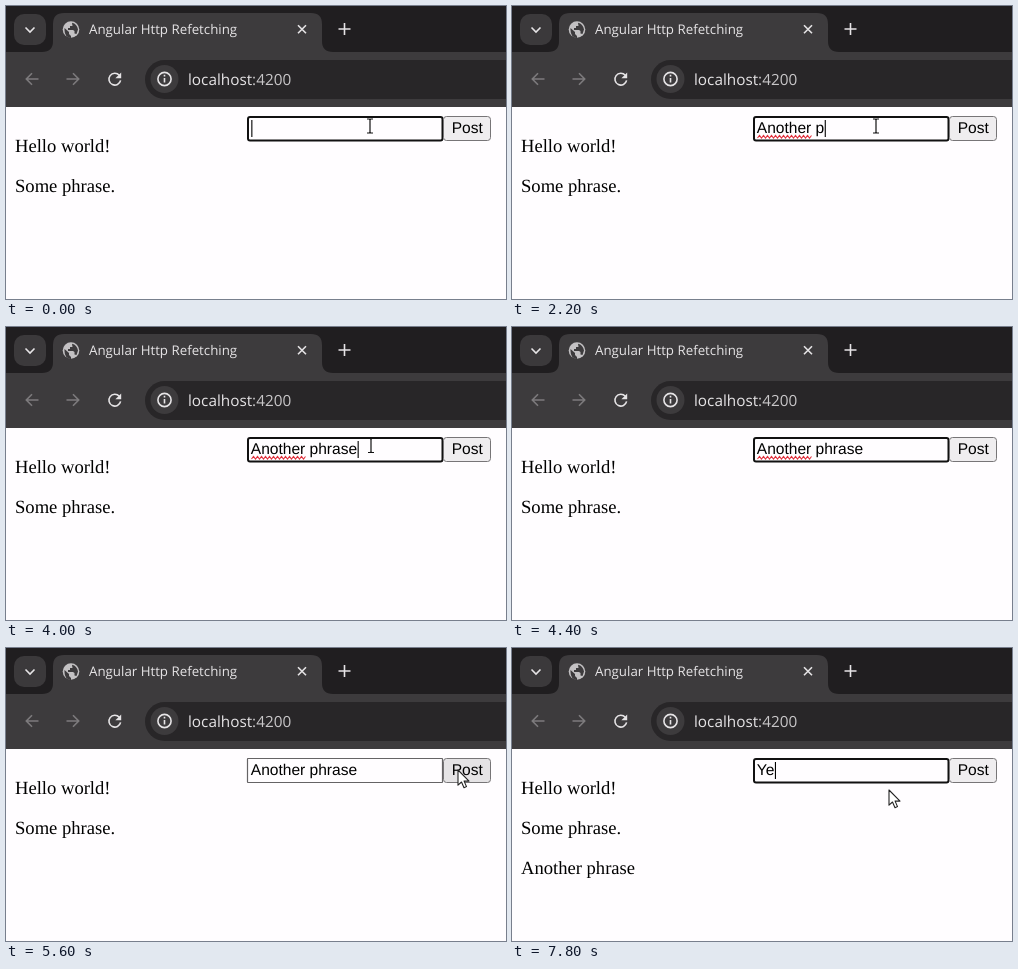
An HTML page that plays this animation: 500x293 px, repeating every 8000 ms.

```html
<!DOCTYPE html>
<html lang="en">
<head>
<meta charset="utf-8">
<title>Angular Http Refetching</title>
<style>
  html, body { margin: 0; width: 100%; height: 100%; overflow: hidden; background: #fffdff; }
  svg { display: block; width: 100%; height: 100%; }
  text { white-space: pre; text-rendering: geometricPrecision; }
  .ui { font-family: "Open Sans", "Noto Sans", sans-serif; fill: #e6e4e6; }
  .page { font: 18.6px "Liberation Serif", "Times New Roman", serif; }
  .form { font: 15.55px "Liberation Sans", Arial, sans-serif; }
  .line { fill: none; stroke: #e6e4e6; stroke-width: 1.6; }
  .dim { stroke: #7d7b7d; }
</style>
</head>
<body>
<svg viewBox="0 0 500 293" preserveAspectRatio="none">
  <rect width="500" height="293" fill="#fffdff"/>

  <!-- tab strip -->
  <rect width="500" height="101" fill="#201e20"/>
  <rect x="8" y="8" width="32" height="31" rx="10" fill="#3b393b"/>
  <path class="line" d="M19.5 21.5l4.5 4.5 4.5-4.5" stroke-width="2"/>
  <path fill="#3d3b3d" d="M0 46H36Q47 46 47 35V18Q47 7 58 7H305Q316 7 316 18V35Q316 46 327 46H500V101H0Z"/>
  <circle cx="65" cy="23.5" r="8.3" fill="#c3c1c3"/>
  <path fill="#3d3b3d" d="M58.5 22l4.5 4v2l2 2v2.2q-6.5-1-6.5-8.2zM66 16.8q5 1 6 6.700l-1.500 4.500-2-.5v-2.500l-1.500-1h-5v-2h2v-2h2.500z"/>
  <text class="ui" x="83" y="28.300" font-size="13.300">Angular Http Refetching</text>
  <path class="line" d="M292 19.200l8 8m0-8l-8 8"/>
  <path class="line" d="M332.500 23h12m-6-6v12"/>

  <!-- toolbar -->
  <path class="line dim" d="M32.500 73H20.500m5.500-5.800L20.300 73l5.700 5.800"/>
  <path class="line dim" d="M60.500 73h12m-5.500-5.800l5.700 5.800-5.700 5.800"/>
  <path class="line" d="M113.300 69.300a5.900 5.900 0 1 0 1.300 5.100"/>
  <path d="M115.200 66.400v5.800h-5.800z" fill="#e6e4e6"/>
  <rect x="139" y="54" width="400" height="39" rx="19.500" fill="#282628"/>
  <circle cx="158.500" cy="73" r="14" fill="#3d3b3d"/>
  <circle class="line" cx="158.500" cy="73" r="6.600" stroke-width="1.500"/>
  <path class="line" d="M158.500 72v4.600m0-7.800v1.800"/>
  <text class="ui" x="182" y="79.300" font-size="15.300">localhost<tspan fill="#c9c7c9">:4200</tspan></text>

  <!-- page -->
  <g class="page">
    <text x="9" y="146">Hello world!</text>
    <text x="9" y="186">Some phrase.</text>
    <text id="added" x="9" y="226">Another phrase</text>
  </g>
  <g class="form">
    <rect id="field" fill="#fffdff"/>
    <text id="typed" x="244.800" y="127.200"></text>
    <path id="squiggle" fill="none" stroke="#e0303c" stroke-width="1.100"/>
    <rect id="caret" y="114" width="1.100" height="17"/>
    <rect id="button" x="437.500" y="110.500" width="47" height="24" rx="3" stroke="#777577"/>
    <text x="445.700" y="127.200">Post</text>
  </g>

  <!-- pointers, each with its hot spot at 0,0 -->
  <g id="beam" fill="none">
    <path d="M-3-7h2.300L0-6.300.7-7H3M0-6.300V6.300M-3 7h2.300L0 6.300.7 7H3" stroke="#111" stroke-width="1.200"/>
  </g>
  <path id="arrow" d="M0 0V15.200l3.500-3.200 2.500 5.700 2.500-1.100-2.400-5.500h4.900z" fill="#fff" stroke="#222" stroke-width="1.100" stroke-linejoin="round"/>
</svg>
<script>
const LOOP = 8000;
const $ = id => document.getElementById(id);

// Each table holds [start time, value]; a value holds until the next row.
const typed = [
  [0, ""], [1000, "A"], [1200, "An"], [1400, "Ano"], [1600, "Anot"],
  [1800, "Anothe"], [2000, "Another "], [2200, "Another p"], [2400, "Another ph"],
  [2800, "Another phr"], [3000, "Another phra"], [3400, "Another phras"],
  [3600, "Another phrase"], [5800, ""], [7800, "Ye"]
];
const caret = [
  [0, 1], [200, 0], [600, 1], [4200, 0], [4800, 1], [5200, 0],
  [7000, 1], [7600, 0], [7800, 1]
];
const focus = [[0, 1], [5200, 0], [7000, 1]];
const spelling = [[0, 0], [2000, 1], [5200, 0]];
const added = [[0, 0], [6000, 1]];
const buttonFill = [
  [0, "#efedef"], [5000, "#e5e3e5"], [5200, "#f5f3f5"], [5400, "#e5e3e5"], [6600, "#efedef"]
];
const pointer = [
  [0, ["beam", 364, 120]], [4000, ["beam", 365, 118.500]],
  [4200, ["arrow", 470, 152]], [4400, ["none", 0, 0]],
  [4600, ["arrow", 489, 160]], [4800, ["arrow", 466, 136]],
  [5000, ["arrow", 452, 122]], [6600, ["beam", 406, 132]],
  [6800, ["beam", 372, 124]], [7200, ["beam", 370, 126]],
  [7400, ["arrow", 374, 137]], [7600, ["arrow", 377, 142]]
];

const at = (table, t) => table.findLast(row => row[0] <= t)[1];

function set(el, attrs) {
  for (const key in attrs) el.setAttribute(key, attrs[key]);
}

function show(el, on) {
  el.style.visibility = on ? "visible" : "hidden";
}

let wave = "M245.500 132";
for (let i = 1; i < 28; i++) wave += `L${245.5 + i * 2} ${i % 2 ? 129.5 : 132}`;
set($("squiggle"), { d: wave });

function drawField(on) {
  set($("field"), on
    ? { x: 242, y: 111, width: 194.5, height: 23.5, rx: 2, stroke: "#111", "stroke-width": 2 }
    : { x: 241.5, y: 110.5, width: 195, height: 24, rx: 0.5, stroke: "#656365", "stroke-width": 1.2 });
}

function draw(t) {
  const text = at(typed, t);
  if ($("typed").textContent !== text) $("typed").textContent = text;
  const width = text ? $("typed").getComputedTextLength() : 0;
  set($("caret"), { x: 245.3 + width });
  show($("caret"), at(caret, t));
  show($("squiggle"), at(spelling, t));
  show($("added"), at(added, t));
  drawField(at(focus, t));
  set($("button"), { fill: at(buttonFill, t) });

  const [kind, x, y] = at(pointer, t);
  for (const id of ["beam", "arrow"]) {
    show($(id), id === kind);
    set($(id), { transform: `translate(${x} ${y})` });
  }
}

const start = performance.now();
function tick() {
  draw((performance.now() - start) % LOOP);
  requestAnimationFrame(tick);
}
tick();
</script>
</body>
</html>
```
